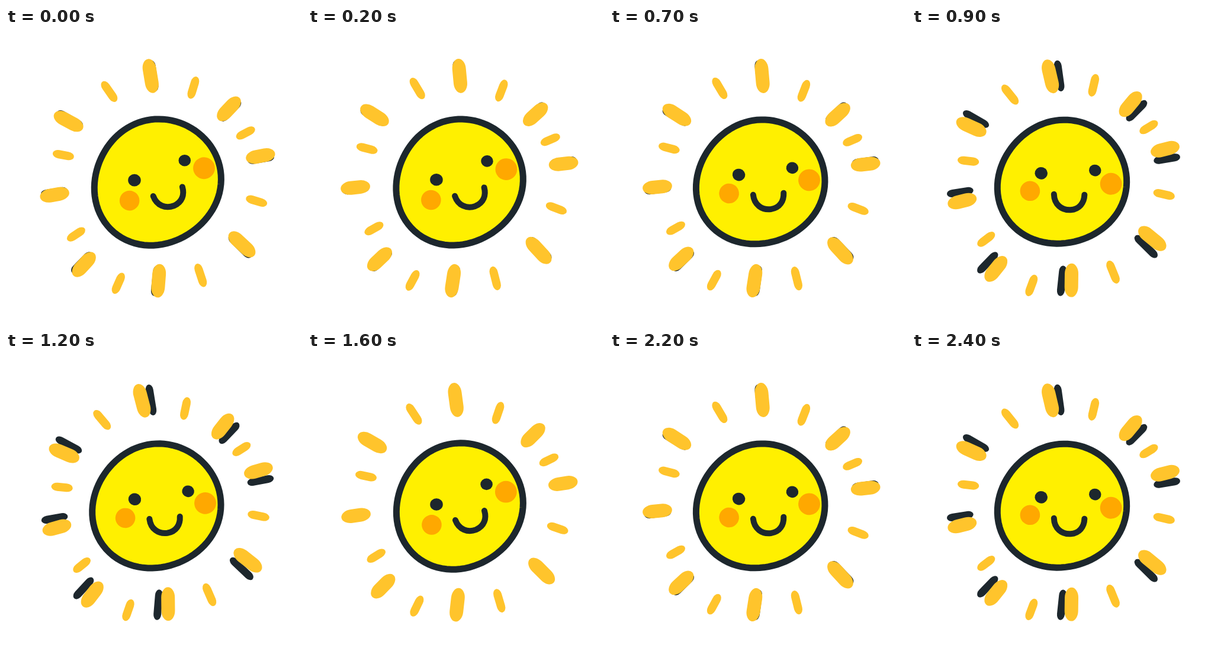
An HTML page for the animation above (2500 ms loop, 500x500 px).

```html
<!DOCTYPE html>
<html lang="en">
<head>
<meta charset="utf-8">
<title>Sun</title>
<style>
  html, body { margin: 0; width: 100%; height: 100%; overflow: hidden; background: #fff; }
  svg { display: block; width: 100vw; height: 100vh; }
</style>
</head>
<body>
<svg viewBox="0 0 500 500">
  <g id="shadows" fill="#1d272d"></g>
  <g id="rays" fill="#ffc42c"></g>
  <g id="face">
    <path id="disc" fill="#fff000" stroke="#1d272d" stroke-width="11"/>
    <circle cx="209" cy="292" r="16.8" fill="#ffa800"/>
    <circle cx="334.3" cy="236" r="18.4" fill="#ffa800"/>
    <ellipse cx="217" cy="257.5" rx="10.8" ry="10.3" fill="#1d272d"/>
    <ellipse cx="301.5" cy="223.3" rx="10.3" ry="9.8" fill="#1d272d"/>
    <path d="M249 284C255 300 270 305.500 284 300C298 294 302 281 298 268"
          fill="none" stroke="#1d272d" stroke-width="10" stroke-linecap="round"/>
  </g>
</svg>
<script>
const LOOP = 2500, CYCLE = 1500, STEP = 100;
const ringCenter = [251, 247], faceCenter = [254, 255], rayFocus = [272, 247];

// Ray centres, clockwise from the top
const longRays = [
  [245, 81], [377, 137], [430, 217], [398, 366], [257, 427], [131, 399], [82, 281], [106, 157]
];
const shortRays = [
  [317, 101], [405, 178], [423, 293], [328, 418], [189, 431], [118, 348], [97, 214], [175, 107]
];

const byId = id => document.getElementById(id);
const cosDeg = degrees => Math.cos(degrees * Math.PI / 180);
const sinDeg = degrees => Math.sin(degrees * Math.PI / 180);

// Rounded bars that all point away from one focus
function addRays(group, centers, length, width) {
  for (const [x, y] of centers) {
    const tilt = Math.atan2(y - rayFocus[1], x - rayFocus[0]) * 180 / Math.PI;
    const size = length * (1 + 0.08 * cosDeg(2 * tilt - 140));
    const rect = document.createElementNS("http://www.w3.org/2000/svg", "rect");
    const attrs = {
      x: x - size / 2, y: y - width / 2, width: size, height: width,
      rx: width * 0.75, ry: width / 2, transform: `rotate(${tilt} ${x} ${y})`
    };
    for (const name in attrs) rect.setAttribute(name, attrs[name]);
    group.append(rect);
  }
}

// A circle made slightly lopsided by three harmonics
function discPath() {
  const points = [];
  for (let a = 0; a < 360; a += 4) {
    const r = 106.5 + 6 * cosDeg(a - 76) + 3.5 * cosDeg(2 * (a - 135)) + 1.5 * cosDeg(3 * (a - 125));
    points.push([faceCenter[0] + r * cosDeg(a), faceCenter[1] + r * sinDeg(a)]);
  }
  return `M${points.join("L")}Z`;
}

function turn(id, angle, center) {
  byId(id).setAttribute("transform", `rotate(${angle.toFixed(3)} ${center.join(" ")})`);
}

function draw(elapsed) {
  const time = Math.floor(elapsed % LOOP / STEP) * STEP;
  const phase = time / CYCLE * 360;
  turn("rays", 0.9 + 7.3 * sinDeg(phase - 9) - 1.6 * sinDeg(2 * phase), ringCenter);
  turn("shadows", 1.8 + 1.8 * cosDeg(phase - 108), ringCenter);
  turn("face", 10 - 9.15 * cosDeg(phase - 33) - 1.87 * cosDeg(2 * phase + 15), faceCenter);
}

addRays(byId("shadows"), longRays, 49, 13);
addRays(byId("rays"), longRays, 54, 23);
addRays(byId("rays"), shortRays, 38, 14);
byId("disc").setAttribute("d", discPath());

const start = performance.now();
function tick() {
  draw(performance.now() - start);
  requestAnimationFrame(tick);
}
tick();
</script>
</body>
</html>
```
